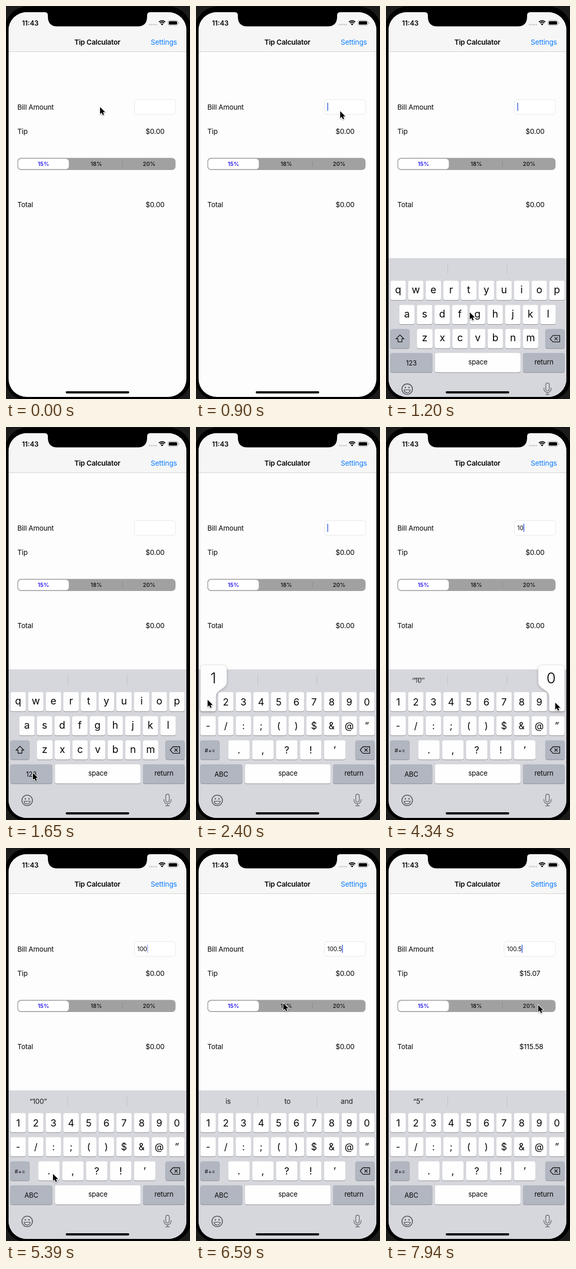
Recreate the animation shown at these times as an HTML page with a canvas. Size 356 by 762 pixels, loop 8 s.

```html
<!DOCTYPE html>
<html lang="en">
<head>
<meta charset="utf-8">
<title>Tip Calculator</title>
<style>
html, body { margin: 0; width: 100%; height: 100%; overflow: hidden; background: #000; }
canvas { display: block; width: 356px; height: 762px; }
</style>
</head>
<body>
<canvas id="stage"></canvas>
<script>
const W = 356, H = 762, LOOP = 8000;
const canvas = document.getElementById('stage');
const ctx = canvas.getContext('2d');
const dpr = window.devicePixelRatio || 1;
canvas.width = W * dpr;
canvas.height = H * dpr;

const FAMILY = 'Inter, "Liberation Sans", sans-serif';
const KEY_W = 30, KEY_H = 37.3, PITCH = 34.13;
const KB_TOP = 470;

// Pointer tip: time, x, y
const POINTER = [
  [0, 182, 196], [300, 232, 186], [600, 279, 204], [900, 279, 204],
  [1050, 238, 420], [1200, 162, 594], [1350, 96, 650], [1500, 54, 671],
  [1950, 48, 670], [2250, 27, 552], [2400, 22.5, 529], [2550, 22.5, 529],
  [2700, 120, 540], [2850, 268, 541], [2990, 321, 537], [3290, 327.5, 534.5],
  [4790, 327.5, 534.5], [5090, 166, 606], [5240, 97, 634], [5390, 91, 632],
  [5690, 91, 632], [5990, 155, 540], [6140, 160, 531], [6290, 160, 531],
  [6440, 166, 400], [6590, 169, 301], [7040, 169, 301], [7340, 72, 304],
  [7490, 74, 304], [7790, 262, 305], [7940, 294.5, 304.5]
];

// State changes: each entry holds from its time on
const AMOUNT = [[0, ''], [2550, '1'], [4040, '10'], [4790, '100'], [5690, '100.'], [6290, '100.5']];
const HINTS = [
  [0, []], [2550, ['“1”']], [4490, ['“10”']], [4940, ['“100”']],
  [5840, ['is', 'to', 'and']], [6740, ['“5”']]
];
const POPUPS = [
  [0, ''], [2400, '1'], [2550, ''], [4340, '0'], [4490, ''], [4640, '0'], [4790, ''],
  [5540, '.'], [5690, ''], [6140, '5'], [6290, '']
];
const RESULT = [
  [0, { x: 270, tip: '$0.00', total: '$0.00' }],
  [7040, { x: 257, tip: '$18.09', total: '$118.59' }],
  [7640, { x: 258, tip: '$15.07', total: '$115.58' }]
];

const entryAt = (list, t) => list.filter(e => e[0] <= t).pop();
const stateAt = (list, t) => entryAt(list, t)[1];
const clamp = (v, a, b) => Math.min(b, Math.max(a, v));
const ease = p => p * p * (3 - 2 * p);

function tick(ms) {
  const base = ms < 2990 ? 0 : 2990;
  return base + Math.floor((ms - base) / 150) * 150;
}

function pointerAt(t) {
  const i = POINTER.findIndex(p => p[0] > t);
  if (i < 0) return POINTER[POINTER.length - 1].slice(1);
  const [t0, x0, y0] = POINTER[i - 1], [t1, x1, y1] = POINTER[i];
  const p = (t - t0) / (t1 - t0);
  return [x0 + (x1 - x0) * p, y0 + (y1 - y0) * p];
}

function box(x, y, w, h, r, fill, stroke, lw = 1) {
  ctx.beginPath();
  ctx.roundRect(x, y, w, h, r);
  if (fill) { ctx.fillStyle = fill; ctx.fill(); }
  if (stroke) { ctx.strokeStyle = stroke; ctx.lineWidth = lw; ctx.stroke(); }
}

function dot(x, y, r, fill) {
  ctx.beginPath();
  ctx.arc(x, y, r, 0, 7);
  ctx.fillStyle = fill;
  ctx.fill();
}

function line(points, stroke, lw, close) {
  ctx.beginPath();
  points.forEach(([x, y]) => ctx.lineTo(x, y));
  if (close) ctx.closePath();
  ctx.strokeStyle = stroke;
  ctx.lineWidth = lw;
  ctx.stroke();
}

function text(str, x, y, size, { align = 'left', weight = 400, color = '#050505', gap = -0.2 } = {}) {
  ctx.font = `${weight} ${size}px ${FAMILY}`;
  ctx.letterSpacing = gap + 'px';
  ctx.textAlign = align;
  ctx.fillStyle = color;
  ctx.fillText(str, x, y);
  return ctx.measureText(str).width;
}
const mid = (str, x, y, size, opts) => text(str, x, y, size, { align: 'center', ...opts });

function drawStatus() {
  text('11:43', 31, 37.5, 13, { weight: 600, gap: 0 });
  for (let i = 0; i < 4; i++) dot(278 + i * 4.2, 36, 1.6, '#c6c6c8');
  // signal fan
  ctx.strokeStyle = '#000';
  ctx.lineWidth = 2;
  for (const r of [8.6, 5.4]) {
    ctx.beginPath();
    ctx.arc(302, 37, r, -Math.PI * 0.75, -Math.PI * 0.25);
    ctx.stroke();
  }
  ctx.beginPath();
  ctx.moveTo(302, 37.6);
  ctx.arc(302, 37.4, 3.2, -Math.PI * 0.75, -Math.PI * 0.25);
  ctx.fillStyle = '#000';
  ctx.fill();
  box(313.5, 28, 19, 9.6, 2.8, null, '#a0a0a2', 0.9);
  box(315, 29.5, 16, 6.6, 1.6, '#000');
  box(333.8, 31.2, 1.2, 3.2, 0.6, '#a0a0a2');
}

function drawNotch() {
  ctx.beginPath();
  ctx.moveTo(75, 10);
  ctx.lineTo(75, 12);
  ctx.quadraticCurveTo(81, 12, 81, 18);
  ctx.lineTo(81, 22);
  ctx.quadraticCurveTo(82, 39.5, 99, 39.5);
  ctx.lineTo(255, 39.5);
  ctx.quadraticCurveTo(272, 39.5, 273, 22);
  ctx.lineTo(273, 18);
  ctx.quadraticCurveTo(273, 12, 279, 12);
  ctx.lineTo(279, 10);
  ctx.fillStyle = '#000';
  ctx.fill();
}

function caretAlpha(t) {
  const since = Math.max(900, entryAt(AMOUNT, t)[0]);
  const phase = (t - since) % 1200;
  if (t < 900) return 0;
  return phase < 600 || phase >= 1000 ? 1 : phase < 750 ? 0.5 : 0;
}

function drawSegments(t) {
  const toMid = clamp((t - 6740) / 300, 0, 1), back = clamp((t - 7340) / 300, 0, 1);
  const pos = ease(toMid) - ease(back);
  box(22, 294.5, 306, 23.5, 7, '#a1a1a1');
  ctx.fillStyle = 'rgba(80,80,80,.25)';
  if (pos < 0.5) ctx.fillRect(225, 300, 1, 12);
  box(23.5 + pos * 102, 296.3, 98, 20, 5.5, '#fff');
  const chosen = pos < 0.5 ? 0 : 1;
  ['15%', '18%', '20%'].forEach((s, i) =>
    mid(s, 72.5 + i * 102.2, 310.2, 10.8, { weight: i === chosen ? 600 : 500, color: i === chosen ? '#2416f0' : '#0a0a0a', gap: 0 }));
}

function drawForm(t) {
  const r = stateAt(RESULT, t), left = r.x === 270 ? 248 : r.x - 30;
  text('Bill Amount', 22, 200.8, 13.6);
  text('Tip', 22, 247.8, 13.6);
  text('Total', 22, 390.2, 13.6);
  text(r.tip, r.x, 248, 13.6);
  text(r.total, r.x, 390.4, 13.6);

  box(left + 0.5, 181.5, 328 - left - 0.5, 28.5, 4.5, '#fff', '#e6e6e7');
  const w = text(stateAt(AMOUNT, t), left + 6, 200, 11.4, { gap: 0 });
  ctx.globalAlpha = caretAlpha(t);
  box(left + 6 + w, 187.5, 1.6, 16, 0.8, '#3f66e2');
  ctx.globalAlpha = 1;
  drawSegments(t);
}

function key(x, y, w, dark) {
  box(x, y + 1, w, KEY_H, 4, '#8b8d93');
  box(x, y, w, KEY_H, 4, dark ? '#b1b6c0' : '#fefefe');
}

function keyRow(chars, x, y, size, base, w = KEY_W, pitch = PITCH) {
  [...chars].forEach((c, i) => {
    key(x + i * pitch, y, w);
    mid(c, x + i * pitch + w / 2, y + base, size, { gap: 0 });
  });
}

function drawShift(x, y) {
  const half = [[0, -7.5], [7.5, 0], [3.8, 0], [3.8, 6]];
  const other = half.slice(1).reverse().map(([a, b]) => [-a, b]);
  line(half.concat(other).map(([a, b]) => [x + a, y + b]), '#111', 1.3, true);
}

function drawDelete(x, y) {
  line([[x - 9.5, y], [x - 4, y - 6.3], [x + 9, y - 6.3], [x + 9, y + 6.3], [x - 4, y + 6.3]], '#111', 1.3, true);
  line([[x - 1, y - 3], [x + 5, y + 3]], '#111', 1.3);
  line([[x + 5, y - 3], [x - 1, y + 3]], '#111', 1.3);
}

function drawSmiley(x, y) {
  const ink = '#555860';
  ctx.strokeStyle = ink;
  ctx.lineWidth = 1.6;
  ctx.beginPath();
  ctx.arc(x, y, 10.2, 0, 7);
  ctx.stroke();
  dot(x - 3.5, y - 3, 1.4, ink);
  dot(x + 3.5, y - 3, 1.4, ink);
  ctx.beginPath();
  ctx.arc(x, y + 1, 6, 0.1, Math.PI - 0.1);
  ctx.closePath();
  ctx.lineWidth = 1.3;
  ctx.stroke();
}

function drawMic(x, y) {
  const ink = '#6a6d75';
  box(x - 3.4, y - 11.5, 6.8, 15, 3.4, null, ink, 1.4);
  ctx.beginPath();
  ctx.moveTo(x + 7, y - 2);
  ctx.lineTo(x + 7, y);
  ctx.arc(x, y, 7, 0, Math.PI);
  ctx.lineTo(x - 7, y - 2);
  ctx.stroke();
  line([[x, y + 7], [x, y + 11]], ink, 1.4);
  line([[x - 4, y + 11], [x + 4, y + 11]], ink, 1.4);
}

function drawHints(t, y) {
  ctx.fillStyle = '#bfc1c8';
  ctx.fillRect(119, y + 10, 1, 21);
  ctx.fillRect(233.5, y + 10, 1, 21);
  const show = (words, alpha) => {
    ctx.globalAlpha = alpha;
    words.forEach((s, i) => mid(s, 62.3 + i * 114.7, y + 26, 13.6, { color: '#1a1a1c' }));
    ctx.globalAlpha = 1;
  };
  if (t >= 4340 && t < 4490) show(['“10”'], 0.75);
  show(stateAt(HINTS, t), t >= 4340 && t < 4490 ? 0.5 : 1);
}

function drawPopup(c, top) {
  const wide = c === '.';
  const w = wide ? 41.5 : KEY_W;
  const x = wide ? 62.3 : 8.5 + '1234567890'.indexOf(c) * PITCH;
  const y = top + (wide ? 137.5 : 44);
  const half = wide ? 30 : 25.5;
  const l = clamp(x + w / 2 - half, 8.5, 345.5 - 2 * half), r = l + 2 * half;
  const up = y - 52, bottom = y + KEY_H;
  ctx.save();
  ctx.shadowColor = 'rgba(0,0,0,.28)';
  ctx.shadowBlur = 5 * dpr;
  ctx.shadowOffsetY = dpr;
  ctx.beginPath();
  ctx.moveTo(l, up + 8);
  ctx.quadraticCurveTo(l, up, l + 8, up);
  ctx.lineTo(r - 8, up);
  ctx.quadraticCurveTo(r, up, r, up + 8);
  ctx.lineTo(r, y - 20);
  ctx.bezierCurveTo(r, y - 5, x + w, y - 6, x + w, y + 9);
  ctx.lineTo(x + w, bottom - 4);
  ctx.quadraticCurveTo(x + w, bottom, x + w - 4, bottom);
  ctx.lineTo(x + 4, bottom);
  ctx.quadraticCurveTo(x, bottom, x, bottom - 4);
  ctx.lineTo(x, y + 9);
  ctx.bezierCurveTo(x, y - 6, l, y - 5, l, y - 20);
  ctx.closePath();
  ctx.fillStyle = '#fdfdfd';
  ctx.fill();
  ctx.restore();
  mid(c, (l + r) / 2 - 0.5, y - 17.5, 29, { gap: 0, weight: 300 });
}

function drawKeyboard(t) {
  if (t < 900) return;
  const y = KB_TOP + (t > 1500 ? 0 : 288 * Math.exp((900 - t) / 110));
  const letters = t < 1950;
  ctx.fillStyle = '#d6d7dc';
  ctx.fillRect(5, y, 344, 300);
  drawHints(t, y);

  const [r1, r2, r3, r4] = [44, 90.8, 137.5, 184].map(d => y + d);
  key(8.5, r3, 37, true);
  key(308.5, r3, 37, true);
  if (letters) {
    keyRow('qwertyuiop', 8.5, r1, 19.5, 24);
    keyRow('asdfghjkl', 25.5, r2, 19.5, 24);
    keyRow('zxcvbnm', 60, r3, 19.5, 24);
    drawShift(27, r3 + 19);
  } else {
    keyRow('1234567890', 8.5, r1, 18.6, 26);
    keyRow('-/:;()$&@”', 8.5, r2, 18, 25);
    keyRow('.,?!’', 62.3, r3, 19, 25.5, 41.5, 46.3);
    mid('#+=', 27, r3 + 23, 10.5, { gap: 0 });
  }
  drawDelete(327, r3 + 18.8);

  key(8.5, r4, 81, true);
  key(94.8, r4, 165.2);
  key(265, r4, 80.5, true);
  mid(letters ? '123' : 'ABC', 49, r4 + 24, 13);
  mid('space', 177.7, r4 + 22.3, 13.3);
  mid('return', 305.5, r4 + 22.3, 13.3);
  drawSmiley(41, y + 254);
  drawMic(312.5, y + 253.5);

  const c = stateAt(POPUPS, t);
  if (c) drawPopup(c, y);
}

function drawPointer(t) {
  const [x, y] = pointerAt(t);
  const shape = [[0, 0], [0, 13.6], [3.1, 10.8], [5.2, 15.6], [7.6, 14.6], [5.6, 9.9], [9.8, 9.7]];
  ctx.save();
  ctx.translate(x, y);
  ctx.lineJoin = 'round';
  ctx.shadowColor = 'rgba(0,0,0,.35)';
  ctx.shadowBlur = 2 * dpr;
  ctx.shadowOffsetY = dpr;
  line(shape, '#fff', 2.2, true);
  ctx.shadowColor = 'transparent';
  ctx.fillStyle = '#000';
  ctx.fill();
  ctx.restore();
}

function draw(t) {
  ctx.setTransform(dpr, 0, 0, dpr, 0, 0);
  ctx.textBaseline = 'alphabetic';
  ctx.lineJoin = 'miter';
  ctx.fillStyle = '#1b1b1b';
  ctx.fillRect(0, 0, W, H);
  box(-2, 1, W + 4, H + 2, 44, '#000');

  ctx.save();
  ctx.beginPath();
  ctx.roundRect(5, 12, 344, 746, 35);
  ctx.clip();
  ctx.fillStyle = '#fdfdfd';
  ctx.fillRect(5, 12, 344, 746);
  ctx.fillStyle = '#f6f6f6';
  ctx.fillRect(5, 12, 344, 76);
  ctx.fillStyle = '#d2d2d3';
  ctx.fillRect(5, 88, 344, 1);
  drawStatus();
  mid('Tip Calculator', 176.7, 75.4, 13.6, { weight: 600 });
  text('Settings', 280, 75.4, 13.6, { color: '#0a7cff' });
  drawForm(t);
  drawKeyboard(t);
  box(115.5, 747, 123, 4.2, 2.1, '#000');
  ctx.restore();

  drawNotch();
  drawPointer(t);
}

const start = performance.now();
function loop() {
  draw(tick((performance.now() - start) % LOOP));
  requestAnimationFrame(loop);
}
loop();
</script>
</body>
</html>
```
